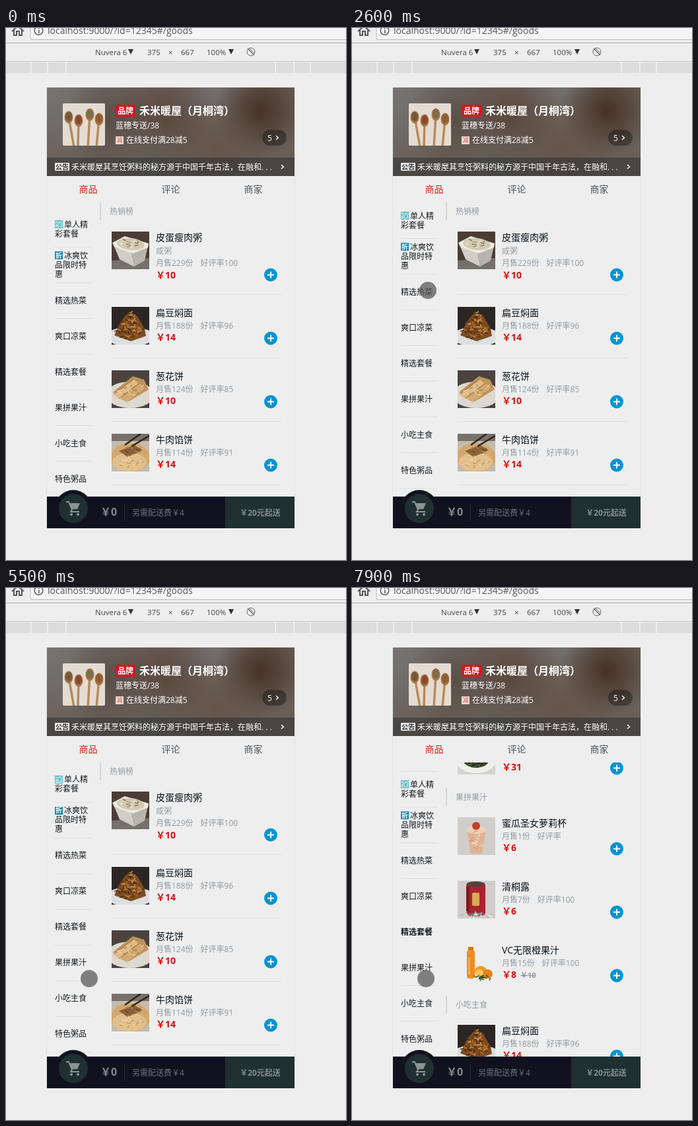
Write an HTML page with a canvas that moves like this. It is 515 px wide and 805 px high and loops after 8 s.

```html
<!DOCTYPE html>
<html lang="zh-CN">
<head>
<meta charset="utf-8">
<style>
html, body { margin: 0; width: 100%; height: 100%; overflow: hidden; background: #eee; }
canvas { display: block; }
</style>
</head>
<body>
<canvas id="stage" width="515" height="805"></canvas>
<script>
const c = document.getElementById('stage').getContext('2d');
const CJK = '"Open Sans", "Noto Sans CJK SC", "Noto Sans CJK", sans-serif';
const UI = '"Open Sans", "Noto Sans", sans-serif';
const LOOP = 8000, TOP = 264, BOTTOM = 709;

// ---------- drawing helpers ----------
function rect(x, y, w, h, color) { c.fillStyle = color; c.fillRect(x, y, w, h); }
function oval(x, y, rx, ry, color, turn = 0) {
  c.fillStyle = color;
  c.beginPath(); c.ellipse(x, y, rx, ry, turn, 0, 7); c.fill();
}
function line(color, width, ...p) {
  c.strokeStyle = color; c.lineWidth = width;
  c.beginPath(); c.moveTo(p[0], p[1]);
  for (let i = 2; i < p.length; i += 2) c.lineTo(p[i], p[i + 1]);
  c.stroke();
}
function poly(color, ...p) {
  c.fillStyle = color;
  c.beginPath();
  for (let i = 0; i < p.length; i += 2) c.lineTo(p[i], p[i + 1]);
  c.fill();
}
function box(x, y, w, h, r, color) {
  c.fillStyle = color;
  c.beginPath(); c.roundRect(x, y, w, h, r); c.fill();
}
// y is the middle of the glyphs; returns the text width
function text(s, x, y, size, color, { bold = false, align = 'left', font = CJK } = {}) {
  c.font = `${bold ? 'bold ' : ''}${size}px ${font}`;
  c.textAlign = align; c.fillStyle = color;
  c.fillText(s, x, Math.round(y + size * .38));
  return c.measureText(s).width;
}
function clipped(x, y, w, h, draw) {
  c.save(); c.beginPath(); c.rect(x, y, w, h); c.clip(); draw(); c.restore();
}
function random(seed) {
  return () => (seed = seed * 16807 % 2147483647) / 2147483647;
}
function strands(n, seed, x, y, rx, ry, colors) {
  const r = random(seed);
  for (let i = 0; i < n; i++) {
    const a = r() * 6.28, d = Math.sqrt(r()), b = r() * 6.28;
    const px = x + Math.cos(a) * d * rx, py = y + Math.sin(a) * d * ry;
    line(colors[i % colors.length], 1.5, px, py, px + Math.cos(b) * 6, py + Math.sin(b) * 4);
  }
}

// ---------- dishes, each 57 x 57 ----------
const dishes = {
  porridge() {
    rect(0, 0, 57, 57, '#4a3d35'); poly('#77706a', 0, 57, 0, 44, 57, 40, 57, 57);
    poly('#d2cec6', 2, 18, 30, 30, 34, 53, 12, 42); poly('#b9b4ac', 30, 30, 55, 22, 50, 44, 34, 53);
    poly('#efece4', 1, 17, 20, 7, 56, 18, 55, 24, 32, 33, 4, 23);
    oval(29, 19, 21, 9, '#d3c9b2', .1);
    strands(14, 5, 28, 18, 14, 5, ['#8b7c64', '#eee6d4', '#a99c7c']);
  },
  noodles() {
    rect(0, 0, 57, 57, '#2b2624'); oval(28, 45, 36, 15, '#dcdee0');
    poly('#7d4b20', 4, 43, 14, 22, 27, 7, 39, 14, 50, 33, 52, 44, 29, 52);
    strands(45, 11, 28, 36, 20, 11, ['#c98e48', '#5a3213', '#ad6f2e', '#3b240e']);
    strands(30, 17, 28, 20, 10, 11, ['#d49c55', '#4b2a10', '#b07635']);
  },
  pancake() {
    rect(0, 0, 57, 57, '#4b4340'); oval(28, 37, 36, 20, '#ddd8d0');
    poly('#c1935a', 2, 33, 32, 9, 49, 14, 56, 29, 26, 47);
    poly('#dfbb88', 3, 37, 34, 14, 41, 20, 11, 43);
    poly('#d2aa73', 13, 43, 43, 20, 50, 27, 23, 48);
    line('#9c6d3b', 1, 11, 43, 41, 20); line('#9c6d3b', 1, 3, 36, 33, 13);
    strands(16, 8, 29, 30, 18, 10, ['#b98a50', '#eed2a4']);
  },
  pie() {
    rect(0, 0, 57, 57, '#c3bcae'); rect(0, 0, 57, 11, '#77716a');
    oval(28, 36, 30, 22, '#d3a86e'); oval(27, 43, 26, 14, '#e2c08d');
    poly('#8a6237', 11, 26, 34, 17, 47, 25, 24, 35);
    strands(10, 13, 29, 26, 12, 5, ['#b98b58', '#6d4a2a']);
    strands(14, 21, 28, 44, 20, 8, ['#c2965c', '#edd3a6']);
    line('#2c2420', 2.5, 20, 17, 44, 0); line('#2c2420', 2.5, 30, 19, 57, 3);
  },
  greens() {
    rect(0, 0, 57, 57, '#d4d4d0'); oval(28, 38, 29, 17, '#efefec');
    oval(28, 34, 20, 13, '#344027');
    strands(45, 31, 28, 33, 18, 12, ['#202b1b', '#60733c', '#46542e']);
  },
  cup() {
    rect(0, 0, 57, 57, '#d1cdcb');
    poly('#dfb396', 14, 19, 43, 19, 37, 55, 20, 55); oval(28, 19, 15, 6, '#ecd0ba');
    strands(20, 9, 28, 34, 9, 14, ['#d49a78', '#f0d8c8']); oval(28, 13, 6, 6, '#c43f2b');
  },
  can() {
    rect(0, 0, 57, 57, '#d2cdcc'); box(13, 4, 29, 48, 4, '#a92430');
    rect(13, 9, 5, 38, '#7d1923'); oval(27.5, 5, 14, 4, '#55413d');
    oval(27.5, 51, 13, 3, '#776864'); box(22, 18, 11, 20, 2, '#d8aa52');
    strands(18, 4, 28, 52, 26, 4, ['#efecec', '#b6b0b0']);
  },
  juice() {
    rect(0, 0, 57, 57, '#eee'); rect(16, 4, 8, 6, '#d97915');
    box(14, 9, 12, 43, 4, '#ec8d20'); rect(16, 19, 3, 27, '#f5ac4b');
    oval(35, 41, 9, 8, '#ef9b24'); oval(45, 45, 8, 7, '#e8821a');
    oval(33, 43, 6, 5, '#f8c15a'); strands(15, 7, 38, 51, 12, 3, ['#344326', '#5d6c36']);
  }
};

// ---------- content ----------
const dish = (name, sold, rate, price, kind, more = {}) => ({ name, sold, rate, price, kind, ...more });
const sections = [
  { title: '热销榜', rows: ['热销榜'], items: [
    dish('皮蛋瘦肉粥', 229, 100, 10, 'porridge', { note: '咸粥' }),
    dish('扁豆焖面', 188, 96, 14, 'noodles'),
    dish('葱花饼', 124, 85, 10, 'pancake'),
    dish('牛肉馅饼', 114, 91, 14, 'pie'),
    dish('猪肉白菜锅贴', 101, 78, 17, 'pancake'),
    dish('南瓜粥', 91, 100, 9, 'porridge'),
    dish('八宝酱菜', 84, 100, 4, 'greens')] },
  { title: '单人精彩套餐', rows: ['单人精', '彩套餐'], mark: ['保', '#48b6c6'], items: [
    dish('红枣山药粥套餐', 17, 100, 29, 'porridge')] },
  { title: '冰爽饮品限时特惠', rows: ['冰爽饮', '品限时特', '惠'], mark: ['折', '#1188ae'], items: [
    dish('VC无限橙果汁', 15, 100, 8, 'juice', { was: 10 })] },
  { title: '精选热菜', rows: ['精选热菜'], items: [
    dish('娃娃菜炖豆腐', 43, 92, 17, 'greens'),
    dish('手撕包菜', 29, 100, 16, 'greens')] },
  { title: '爽口凉菜', rows: ['爽口凉菜'], items: [
    dish('拍黄瓜', 6, 100, 9, 'greens')] },
  { title: '精选套餐', rows: ['精选套餐'], items: [
    dish('红豆薏米粥套餐', 3, 100, 37, 'porridge'),
    dish('皮蛋瘦肉粥套餐', 12, 100, 31, 'greens')] },
  { title: '果拼果汁', rows: ['果拼果汁'], items: [
    dish('蜜瓜圣女萝莉杯', 1, '', 6, 'cup'),
    dish('清桐露', 7, 100, 6, 'can'),
    dish('VC无限橙果汁', 15, 100, 8, 'juice', { was: 10 })] },
  { title: '小吃主食', rows: ['小吃主食'], items: [
    dish('扁豆焖面', 188, 96, 14, 'noodles')] },
  { title: '特色粥品', rows: ['特色粥品'], items: [] }
];
const itemHeight = item => item.note ? 114 : 96;
let total = 0;
for (const s of sections) {
  s.top = total;
  total += 26 + s.items.reduce((sum, item) => sum + itemHeight(item), 0);
}

// ---------- motion: [time, values...] ----------
const menuKeys = [[0, 0], [1300, 0], [1800, -18], [2100, 0], [2400, 0], [2600, -13], [2800, 0], [2900, 0],
  [3200, 44], [3600, 72], [3700, 68], [4100, 41], [4500, 41], [4800, -14], [5100, 0], [5400, 0],
  [5500, -7.5], [5900, -42], [6300, -3], [6500, 0]];
const touchKeys = [[1000, 108, 588], [1300, 109, 572], [1800, 112, 470], [2400, 114, 436], [2600, 115, 397],
  [2900, 116, 469], [3600, 117, 603], [4400, 121, 600], [4800, 123, 450], [5400, 126, 613], [5500, 126, 591],
  [5900, 124, 480], [6500, 120, 560], [7100, 117, 595], [7500, 112, 591]];
function at(keys, t) {
  const i = keys.findIndex(k => k[0] > t);
  if (i < 0) return keys.at(-1).slice(1);
  if (!i) return keys[0].slice(1);
  const a = keys[i - 1], b = keys[i], p = (t - a[0]) / (b[0] - a[0]);
  return a.slice(1).map((v, n) => v + (b[n + 1] - v) * p);
}
function listScroll(t) {
  const p = Math.min(1, Math.max(0, (t - 7600) / 300));
  return (sections[6].top - 39) * (1 - (1 - p) ** 2);
}

// ---------- parts ----------
function browser() {
  rect(0, 0, 515, 805, '#eee');
  box(36.5, -20, 500, 38, 4, '#bbb'); box(37.5, -20, 500, 37, 3, '#f5f5f5');
  line('#555', 2, 9, 5, 18, -3, 27, 5);
  line('#555', 2, 12, 3, 12, 11, 16, 11, 16, 5, 20, 5, 20, 11, 24, 11, 24, 3);
  c.lineWidth = 1.4; c.strokeStyle = '#555';
  c.beginPath(); c.arc(49.5, 4, 6.3, 0, 7); c.stroke();
  rect(49, 3, 1.5, 5, '#555'); rect(49, 0, 1.5, 1.5, '#555');
  text('localhost:9000/?id=12345#/goods', 63, 4, 14, '#555', { font: UI });
  rect(0, 22, 515, 1, '#aaa'); rect(0, 50, 515, 1, '#c4c4c4');
  const label = (s, x) => text(s, x, 37, 11.5, '#444', { font: UI });
  label('Nuvera 6', 135); label('375', 214); label('×', 246); label('667', 265); label('100%', 304);
  for (const x of [189, 341]) poly('#333', x - 4, 32, x + 4, 32, x, 40);
  c.lineWidth = 1; c.strokeStyle = '#666';
  c.beginPath(); c.arc(371, 36, 6, 0, 7); c.stroke();
  line('#666', 1.3, 366, 31, 376, 41); line('#666', 1, 368, 30, 376, 38);
  rect(0, 52, 515, 16, '#ddd');
  for (const x of [37, 62, 90, 407, 435, 460]) rect(x, 52, 2, 16, '#eee');
}

function glow(x, y, r, rgb, a) {
  const g = c.createRadialGradient(x, y, 0, x, y, r);
  g.addColorStop(0, `rgba(${rgb},${a})`); g.addColorStop(1, `rgba(${rgb},0)`);
  c.fillStyle = g; c.fillRect(x - r, y - r, 2 * r, 2 * r);
}
function chevron(x, y) { line('#fff', 1.4, x - 2, y - 3, x + 1.5, y, x - 2, y + 3); }

function spoons() {
  rect(0, 0, 64, 64, '#e4dcd2');
  const bowls = ['#6e5a40', '#8a4a2c', '#77704c', '#8f5f33'];
  [[9, 21, 17], [24, 26, 23], [41, 17, 38], [55, 24, 51]].forEach(([x, y, end], i) => {
    line('#b78a5c', 3.5, x, y, end, 66);
    oval(x, y, 6.5, 9.5, '#a87445'); oval(x, y - 1, 4.8, 7, bowls[i]);
  });
}

function shopHeader() {
  clipped(62, 90, 375, 134, () => {
    rect(62, 90, 375, 134, '#685f58');
    glow(62, 90, 130, '122,122,122', .8); glow(325, 85, 75, '118,114,112', .9);
    glow(155, 140, 70, '84,72,62', .7); glow(240, 140, 75, '88,66,56', .8);
    glow(385, 125, 70, '68,47,36', .95); glow(320, 185, 80, '98,80,68', .7);
    glow(220, 205, 70, '98,98,90', .6); glow(437, 215, 70, '105,96,88', .8);
    rect(62, 196, 375, 28, 'rgba(7,17,27,.32)');
  });
  c.save(); c.translate(86, 114);
  c.beginPath(); c.roundRect(0, 0, 64, 64, 2); c.clip();
  spoons();
  c.restore();
  box(166, 116, 30, 18, 2, '#d9141e');
  text('品牌', 181, 125, 12, '#fff', { bold: true, align: 'center' });
  text('禾米暖屋（月桐湾）', 202, 125, 16, '#fff', { bold: true });
  text('蓝穗专送/38', 166, 147, 12, '#fff');
  rect(166, 164, 12, 12, '#f2dcd5');
  text('减', 172, 170, 9, '#d2604c', { align: 'center' });
  text('在线支付满28减5', 182, 169, 12, '#fff');
  box(388, 154, 37, 24, 12, 'rgba(0,0,0,.35)');
  text('5', 396, 166, 12, '#fff'); chevron(411, 166);
  box(74, 204, 22, 12, 1, '#eee');
  text('公告', 85, 210, 10, '#333', { bold: true, align: 'center' });
  text('禾米暖屋其烹饪粥料的秘方源于中国千年古法，在融和. . .', 99, 210, 12, '#fff');
  chevron(419, 210);
  ['商品', '评论', '商家'].forEach((s, i) =>
    text(s, 124.5 + i * 125, 244, 14, i ? '#4d555d' : '#c8281a', { align: 'center' }));
}

function menu(offset, active) {
  clipped(62, TOP, 80, BOTTOM - TOP, () => sections.forEach((s, i) => {
    const mid = 250 + i * 54 + offset, bold = i === active;
    s.rows.forEach((row, n) => {
      const y = mid + (n - (s.rows.length - 1) / 2) * 14;
      const marked = s.mark && !n;
      if (marked) {
        const light = s.mark[0] === '保', top = Math.round(y - 6);
        rect(74, top, 12, 12, s.mark[1]);
        if (light) rect(75, top + 1, 10, 10, '#d4eef0');
        text(s.mark[0], 80, y, 10, light ? '#2aa4b4' : '#fff', { align: 'center', bold: !light });
      }
      text(row, marked ? 88 : 74, y, 12, '#14181c', { bold });
    });
    if (i !== active && i + 1 !== active) rect(74, Math.round(mid + 27), 56, 1, '#dcdfe1');
  }));
}

function food(item, y, ruled) {
  const img = y + 18, low = itemHeight(item) - 96;
  c.save(); c.translate(160, img);
  clipped(0, 0, 57, 57, dishes[item.kind]);
  c.restore();
  text(item.name, 227, img + 9, 14, '#07111b');
  if (item.note) text(item.note, 227, img + 29, 12, '#93999f');
  const w = text(`月售${item.sold}份`, 227, img + 28 + low * 1.1, 12, '#93999f');
  text(`好评率${item.rate}`, 227 + w + 11, img + 28 + low * 1.1, 12, '#93999f');
  const p = text(`￥${item.price}`, 227, img + 46 + low * 1.1, 14, '#d80f0f', { bold: true });
  if (item.was) {
    const x = 227 + p + 6, q = text(`￥${item.was}`, x, img + 47, 11, '#93999f', { bold: true });
    rect(x, img + 47, q, 1, '#93999f');
  }
  const py = img + 47 + low;
  oval(401, py + .5, 10, 10, '#0094d2');
  rect(396, py - .5, 10, 2, '#fff'); rect(400, py - 4.5, 2, 10, '#fff');
  if (ruled) rect(160, y + itemHeight(item) - 1, 257, 1, '#dcdfe1');
}

function list(scroll) {
  clipped(142, TOP, 295, BOTTOM - TOP, () => {
    for (const s of sections) {
      let y = Math.round(TOP + s.top - scroll);
      rect(142, y, 2, 26, '#d3d6d9');
      text(s.title, 157, y + 13, 12, '#93999f');
      y += 26;
      for (const item of s.items) {
        const h = itemHeight(item);
        if (y + h > TOP && y < BOTTOM) food(item, y, !scroll);
        y += h;
      }
    }
  });
}

function cart() {
  rect(62, 709, 375, 48, '#111120'); rect(332, 709, 105, 48, '#203031');
  oval(102, 727, 28, 28, '#111120'); oval(102, 727, 22, 22, '#203031');
  line('#8a9294', 2, 91, 717, 95, 717, 100, 729, 98, 732, 111, 732);
  poly('#8a9294', 96, 719, 112, 719, 108, 728, 100, 728);
  oval(99, 736, 2, 2, '#8a9294'); oval(109, 736, 2, 2, '#8a9294');
  text('￥0', 143, 732, 16, '#85888d', { bold: true });
  rect(179, 721, 1, 24, '#292c37');
  text('另需配送费￥4', 191, 733, 12, '#70737a');
  text('￥20元起送', 385, 733, 12, '#858e90', { bold: true, align: 'center' });
}

function draw(now) {
  const t = Math.floor(now % LOOP / 100) * 100;
  const scroll = listScroll(t);
  const active = sections.findLastIndex(s => s.top <= scroll);
  browser();
  rect(61, 90, 1, 667, '#e0e1e2'); rect(437, 90, 1, 667, '#e0e1e2');
  shopHeader();
  menu(at(menuKeys, t)[0], active);
  list(scroll);
  cart();
  if (t >= 1000) {
    const [x, y] = at(touchKeys, t);
    oval(x, y, 13, 13, 'rgba(90,90,90,.75)');
  }
}

const start = performance.now();
function tick() {
  draw(performance.now() - start);
  requestAnimationFrame(tick);
}
tick();
</script>
</body>
</html>
```
